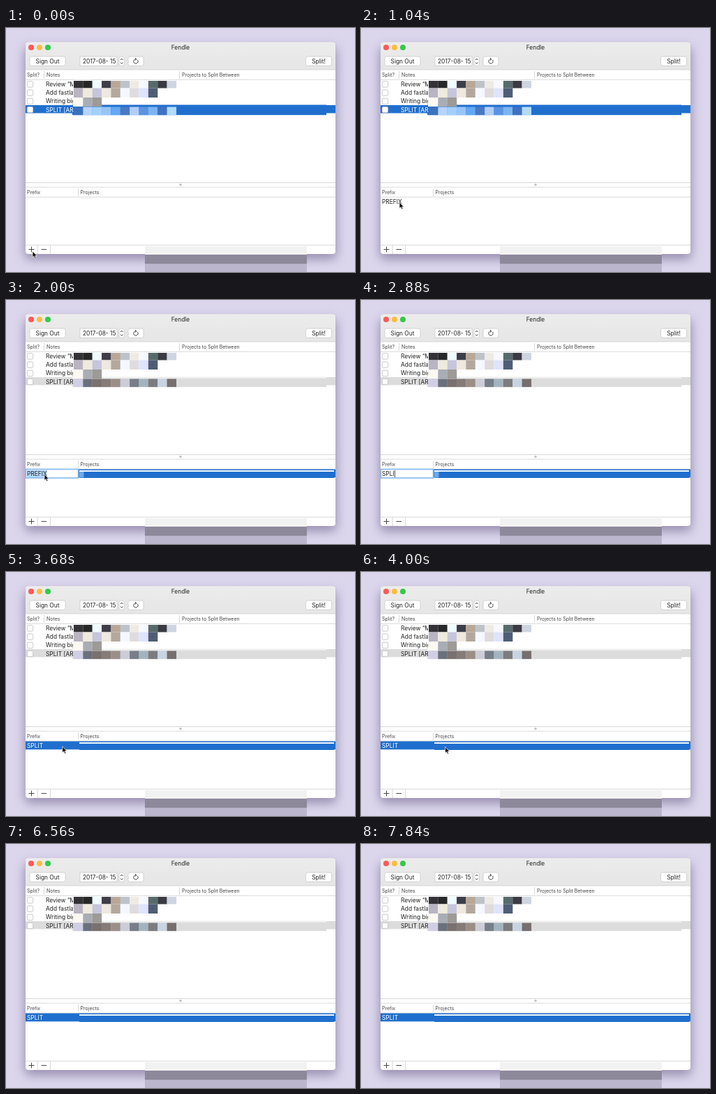
An HTML page that plays this animation: 500 by 351 pixels, repeating every 8 s.

```html
<!DOCTYPE html>
<html lang="en">
<head>
<meta charset="utf-8">
<title>Fendle</title>
<style>
html, body { margin: 0; width: 100%; height: 100%; overflow: hidden; background: #dcd6ed; }
svg { display: block; }
text { font: 8.4px Inter, "Open Sans", sans-serif; fill: #222; }
.head { font-size: 7px; fill: #444; }
.rule { stroke: #d0d0d0; stroke-width: .8; }
.button { fill: #fff; stroke: #c9c9c9; stroke-width: .8; }
.icon { fill: none; stroke: #444; stroke-width: 1; }
.shade { filter: blur(8px); }
</style>
</head>
<body>
<svg width="500" height="351" viewBox="0 0 500 351">
  <defs>
    <linearGradient id="bar" x2="0" y2="1">
      <stop stop-color="#ececec"/><stop offset="1" stop-color="#e6e6e6"/>
    </linearGradient>
    <clipPath id="frame"><rect x="28" y="20.5" width="444" height="304.5" rx="4"/></clipPath>
  </defs>
  <rect width="500" height="351" fill="#dcd6ed"/>
  <rect class="shade" x="27" y="28" width="446" height="304" rx="5" fill="#4b4068" opacity=".5"/>
  <rect x="27.6" y="20.1" width="444.8" height="305.3" rx="4.4" fill="#b5b0c0"/>
  <g clip-path="url(#frame)">
    <rect x="28" y="20" width="444" height="306" fill="#fff"/>
    <rect x="28" y="20" width="444" height="40" fill="url(#bar)"/>
    <circle cx="36" cy="28" r="4" fill="#fc5b57"/>
    <circle cx="48" cy="28" r="4" fill="#fdbc40"/>
    <circle cx="60" cy="28" r="4" fill="#34c84a"/>
    <text x="250" y="31" text-anchor="middle" fill="#333">Fendle</text>
    <g class="button">
      <rect x="34" y="41" width="51" height="13.5" rx="2.5"/>
      <rect x="106" y="41" width="53" height="13.5"/>
      <rect x="162" y="41" width="7.5" height="13.5" rx="2.5"/>
      <rect x="175" y="41" width="22" height="13.5" rx="2.5"/>
      <rect x="429.5" y="41" width="37" height="13.5" rx="2.5"/>
    </g>
    <text x="59.5" y="51" text-anchor="middle">Sign Out</text>
    <text x="110" y="51">2017-08- 15</text>
    <text x="448" y="51" text-anchor="middle">Split!</text>
    <path class="icon" d="M164 46l1.8-2 1.8 2M164 49.5l1.8 2 1.8-2"/>
    <path class="icon" d="M188.5 46a3.2 3.2 0 1 1-2.5-1.2M185 43l2 1.8-2 1.8"/>
    <path class="rule" d="M28 60H472M28 74.4H472M54.5 62V73M248.5 62V73M28 222.5H472M28 229H472M28 243.2H472M103.5 231V242M28 312.3H472M45.3 312V325M63.5 312V325"/>
    <circle cx="250" cy="225.5" r="1.8" fill="#c4c4c4"/>
    <g class="head">
      <text class="head" x="30" y="69.5">Split?</text>
      <text class="head" x="58" y="69.5">Notes</text>
      <text class="head" x="252" y="69.5">Projects to Split Between</text>
      <text class="head" x="30" y="238.5">Prefix</text>
      <text class="head" x="106.5" y="238.5">Projects</text>
    </g>
    <path class="icon" d="M32.5 318.5h8M36.5 314.5v8M50.5 318.5h7.5"/>
    <rect x="107" y="245" width="17" height="1" fill="#eee"/>
    <g id="notes"></g>
    <g id="entry">
      <g id="picked">
        <rect x="28" y="243.5" width="444" height="11.8" fill="#206fce"/>
        <rect x="105" y="245" width="365" height="2" fill="#f4f8fd"/>
        <rect x="105" y="247" width="365" height="9" fill="#206fce"/>
      </g>
      <g id="field">
        <rect x="105" y="247" width="6.5" height="8.5" fill="#6fa9ea"/>
        <rect x="28.5" y="243.5" width="75" height="12.5" fill="#fff" stroke="#84b8ef" stroke-width="1.6"/>
        <rect id="marked" x="30" y="245" width="28.5" height="10" fill="#b3d7fe"/>
        <rect id="caret" y="245" width=".8" height="10" fill="#222"/>
      </g>
      <text id="label" x="30" y="253"></text>
    </g>
  </g>
  <rect x="199" y="314" width="232" height="12" fill="#f2f2f2"/>
  <rect x="199" y="326" width="232" height="13.5" fill="#8e899a"/>
  <rect x="199" y="339.5" width="232" height="11.5" fill="#bbb5cd"/>
  <g id="ring" fill="none">
    <circle r="13" stroke="#fff" stroke-width="3.4" opacity=".7"/>
    <circle r="13" stroke="#111" stroke-width="1.8"/>
  </g>
  <path id="cursor" d="M0 0V9L2 7.2L3.5 10.5L5.1 9.8L3.7 6.7H6.4Z" fill="#111" stroke="#fff" stroke-width=".7"/>
  <rect id="blot" x="124" y="247" width="13.3" height="9" fill="#000"/>
</svg>
<script>
const LOOP = 8000, STEP = 80;
const $ = id => document.getElementById(id);
const show = (id, on) => $(id).setAttribute('display', on ? 'inline' : 'none');
const place = (id, x, y) => $(id).setAttribute('transform', `translate(${x} ${y})`);
const rect = (x, y, w, h, fill) => `<rect x="${x}" y="${y}" width="${w}" height="${h}" fill="${fill}"/>`;

const CELL = 13.36;
const mosaic = (y, h, colors) => colors.split(' ')
  .map((c, i) => rect(97 + i * CELL, y, CELL + .1, h, '#' + c)).join('');

const BLUE = '3a72bd b7d4fb a1d0ff 98c4fc 62a8f5 4879c4 b2cdf9 5b93e0 7cb4f2 4070c2 b0dbfc';
const GRAY = 'd0cfe6 6c707d 78716f 857b78 9a8f87 cccdd8 777e8a a3b4be 7c7c80 c9d4e2 766f6d';
const rows = [
  ['Review “M', 76, 10.5, '343237 28282a effbff 3e3e49 b9a797 bcc3ca efeae4 f7f9ff 586b6c 3b3a42 ccd5e0'],
  ['Add fastlan', 86.5, 13.5, 'b9b4c1 efeade c5c6db eee8de b2a89d f4f8ff e0dcdd dfe3ff 505e75'],
  ['Writing big', 100, 13, 'fbf9f2 abadb4 9d9a97']
];

function drawNotes(active) {
  const fill = active ? '#206fce' : '#dcdcdc';
  const box = y => `<rect x="30.3" y="${y - 4.2}" width="8.4" height="8.4" rx="1.8" fill="#fff" stroke="#bdbdbd" stroke-width=".8"/>`;
  let out = rect(28, 111, 444, 11.5, fill) + rect(95, 110.5, 364, 2.5, active ? fill : '#ededed') +
    rect(95, 113, 364, 12.2, fill);
  rows.forEach(([name, y, h, colors], i) => {
    out += box(81 + i * 12.2) + `<text x="57" y="${84 + i * 12.2}">${name}</text>` +
      rect(96, y, 2, h, '#fff') + mosaic(y, h, colors);
  });
  out += box(117.5) + `<text x="57" y="120.6" style="fill:${active ? '#fff' : '#222'}">SPLIT [AR</text>` +
    mosaic(113.5, 11.7, active ? BLUE : GRAY);
  $('notes').innerHTML = out;
}

// Pointer stops: time, x, y
const stops = [
  [0, 38, 321], [640, 38, 321], [1040, 55, 250.5], [3440, 55, 250.5],
  [4000, 120.5, 251.5], [4160, 124, 250], [4240, 124, 250], [4480, 127, 250],
  [4560, 127, 250], [4880, 129, 250], [6800, 129, 250], [7200, 140, 288], [LOOP, 140, 288]
];
function pointer(t) {
  const i = stops.findIndex(s => s[0] > t);
  const [t0, x0, y0] = stops[i - 1], [t1, x1, y1] = stops[i];
  const p = (t - t0) / (t1 - t0), e = p * p * (3 - 2 * p);
  return [x0 + (x1 - x0) * e, y0 + (y1 - y0) * e];
}

const keys = [2480, 2560, 2720, 2880, 2960];
const within = (t, a, b) => t >= a && t < b;
let wasActive;

function draw(t) {
  const active = t < 1600;
  if (active !== wasActive) drawNotes(wasActive = active);

  const typed = 'SPLIT'.slice(0, keys.filter(k => t >= k).length);
  const editing = within(t, 1920, 3520);
  show('entry', t >= 240);
  show('picked', !active);
  show('field', editing);
  show('marked', !typed);
  show('caret', typed);
  const label = $('label');
  label.textContent = typed || 'PREFIX';
  label.style.fill = active || editing ? '#222' : '#fff';
  if (editing) $('caret').setAttribute('x', 30.3 + label.getComputedTextLength());

  const [x, y] = pointer(t);
  place('cursor', x, y);
  show('cursor', !within(t, 2400, 3520) && !within(t, 5680, 6880) && t < 7200);
  show('ring', within(t, 160, 320) || within(t, 1600, 2000));
  place('ring', x - .5, y + .8);
  show('blot', within(t, 4800, 5680));
}

const start = performance.now();
function tick() {
  const t = (performance.now() - start) % LOOP;
  draw(Math.floor(t / STEP) * STEP);
  requestAnimationFrame(tick);
}
tick();
</script>
</body>
</html>
```
